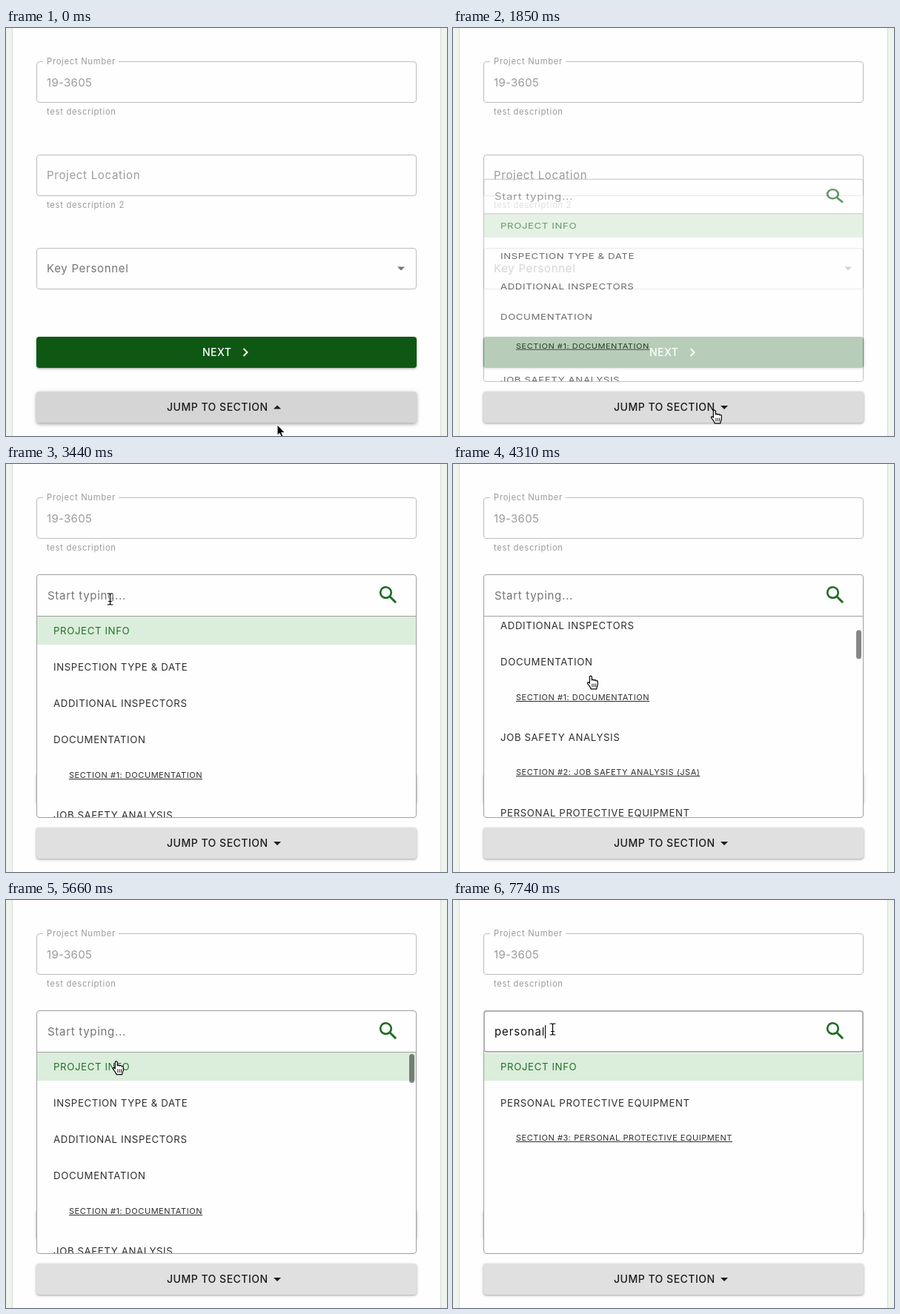
Write an HTML page that moves like this. It is 595 px wide and 551 px high and loops after 8000 ms.

```html
<!DOCTYPE html>
<html lang="en">
<head>
<meta charset="utf-8">
<title>Jump to section</title>
<style>
html, body { margin: 0; width: 100%; height: 100%; overflow: hidden; background: #eef4ed; }
svg { display: block; width: 595px; height: 551px; }
text { font: 15px Inter, "Open Sans", sans-serif; letter-spacing: .7px; }
.small { font-size: 11.25px; letter-spacing: .7px; fill: #9b9b9b; }
.field { fill: none; stroke: #bdbdbd; }
.muted { fill: #9b9b9b; }
.hint { fill: #757575; }
.button { font-size: 14px; font-weight: 500; letter-spacing: .5px; }
.item { font-size: 13.2px; letter-spacing: .64px; fill: #2e2e2e; }
.sub { font-size: 11px; letter-spacing: .55px; fill: #2e2e2e; }
.current { fill: #24702a; }
#next { filter: drop-shadow(0 1px 1px #0004) drop-shadow(0 1px 2px #0002); }
.pointer { stroke-linejoin: round; stroke-linecap: round; }
</style>
</head>
<body>
<svg viewBox="0 0 595 551">
  <defs>
    <clipPath id="listClip"><rect x="42" y="206" width="511" height="271"/></clipPath>
  </defs>
  <rect x="8.5" y="-5" width="578" height="561" fill="#fefefe" stroke="#d6ddd5"/>

  <rect class="field" x="41.5" y="45.5" width="512" height="55" rx="3.5"/>
  <path d="M50 45.5H152" stroke="#fefefe" stroke-width="2"/>
  <text class="small" x="55" y="49">Project Number</text>
  <text class="muted" x="55" y="79" style="letter-spacing:.3px">19-3605</text>
  <text class="small" x="55" y="117">test description</text>

  <rect class="field" x="41.5" y="171.5" width="512" height="55" rx="3.5"/>
  <text class="muted" x="55" y="204">Project Location</text>
  <text class="small" x="55" y="243">test description 2</text>

  <rect class="field" x="41.5" y="297.5" width="512" height="55" rx="3.5"/>
  <text class="hint" x="55" y="330">Key Personnel</text>
  <path d="M528 322.5h10l-5 5z" fill="#757575"/>

  <rect id="next" x="41" y="417" width="513" height="42" rx="4" fill="#0e5814"/>
  <text class="button" x="265" y="443" fill="#fff">NEXT</text>
  <path d="M320.5 433l5 5-5 5" fill="none" stroke="#fff" stroke-width="1.9"/>

  <rect id="jump" x="41" y="491" width="513" height="42" rx="4"/>
  <text class="button" x="217" y="517" fill="#1c1c1c">JUMP TO SECTION</text>
  <path id="caretIcon" fill="#1c1c1c"/>

  <g id="popup">
    <rect x="41.5" y="149.5" width="512" height="328" rx="3.5" fill="#fefefe" stroke="#a0a0a0"/>
    <g clip-path="url(#listClip)">
      <rect id="hover" x="42" width="511" height="38" fill="#000" fill-opacity=".04"/>
      <g id="list"></g>
      <rect id="thumb" x="544" width="7" height="39" rx="3.5" fill="#000" fill-opacity=".47"/>
    </g>
    <path id="divider" d="M42 205.5H553" stroke="#a0a0a0"/>
    <g id="focus">
      <path d="M42 206.5H553" stroke="#fefefe"/>
      <rect x="42" y="150" width="511" height="55" rx="3.5" fill="#fefefe" stroke="#b0b0b0" stroke-width="2"/>
    </g>
    <text id="query" x="56" y="183"></text>
    <path id="caret" stroke="#000"/>
    <g transform="translate(499.8 160.9) scale(1.33)" fill="none" stroke="#1f6d25" stroke-width="2">
      <circle cx="9.5" cy="9.5" r="5.5"/>
      <path d="M13.6 13.6L19.7 19.7" stroke-width="2.2"/>
    </g>
  </g>

  <g id="cursor" class="pointer">
    <path id="arrow" d="M0 0V14.2L3.2 11.3 5.3 16.3 7.8 15.2 5.7 10.4H10z" fill="#000" stroke="#fff"/>
    <g id="hand" stroke="#000">
      <path d="M-1.7 10V1.6c0-2 3-2 3 0V6c.3-1.3 2.8-1.2 2.9.3.5-1 2.6-.8 2.7.6.8-.8 2.4-.4 2.4 1.2v3.5c0 2-1.3 3.3-1.6 6.3H.2c-.4-2.5-3-4.6-4.6-7.4-.9-1.6 1-2.6 2.7-.5z" fill="#fff" stroke-width="1.2"/>
      <path d="M1.8 11v4M4.2 11v4M6.6 11v4" stroke-width=".9"/>
    </g>
    <g id="beam" fill="none">
      <path d="M-3.5-7.5H-1L0-6.5 1-7.5H3.5M-3.5 7.5H-1L0 6.5 1 7.5H3.5M0-6.5V6.5M-2 3H2" stroke="#fff" stroke-width="2.6"/>
      <path d="M-3.5-7.5H-1L0-6.5 1-7.5H3.5M-3.5 7.5H-1L0 6.5 1 7.5H3.5M0-6.5V6.5M-2 3H2" stroke="#000" stroke-width="1.2"/>
    </g>
  </g>
</svg>
<script>
const LOOP = 8000, OPEN = 1850, FOCUS = 6280;
const $ = id => document.getElementById(id);
const set = (id, attrs) => {
  for (const key in attrs) $(id).setAttribute(key, attrs[key]);
};
const show = (id, on) => { $(id).style.display = on ? '' : 'none'; };
const ramp = (t, from, to) => Math.min(1, Math.max(0, (t - from) / (to - from)));
const easeOut = (u, power = 2) => 1 - (1 - u) ** power;

// Linear track of [time, ...values]
function track(keys, t) {
  const i = keys.findIndex(k => k[0] > t);
  if (i < 0) return keys.at(-1).slice(1);
  const a = keys[i - 1], b = keys[i], u = ramp(t, a[0], b[0]);
  return a.slice(1).map((v, n) => v + (b[n + 1] - v) * u);
}

const CURSOR = [
  [0, 366, 536], [60, 366, 536], [400, 371, 471], [640, 368, 477], [840, 360, 500],
  [1250, 353, 516], [2800, 353, 516], [3090, 129.5, 194], [3330, 129.5, 194],
  [3440, 140.5, 182.5], [3800, 140.5, 182.5], [3970, 186, 286], [5600, 186, 286],
  [5660, 149, 218], [5860, 138, 180], [6060, 134.5, 174.5]
];
const HOVER = [[0, 1], [300, 1], [520, 0], [760, 0], [1000, 1], [1770, 1], [1850, .36], [1960, 0]];
const KEYS = [6740, 7040, 7150, 7330, 7430, 7540, 7640, 7740];
const WORD = 'personal';
const SECTIONS = [
  ['PROJECT INFO'],
  ['INSPECTION TYPE & DATE'],
  ['ADDITIONAL INSPECTORS'],
  ['DOCUMENTATION', 'SECTION #1: DOCUMENTATION'],
  ['JOB SAFETY ANALYSIS', 'SECTION #2: JOB SAFETY ANALYSIS (JSA)'],
  ['PERSONAL PROTECTIVE EQUIPMENT', 'SECTION #3: PERSONAL PROTECTIVE EQUIPMENT'],
  ['HOUSEKEEPING']
];

function add(tag, attrs, label = '') {
  const el = document.createElementNS('http://www.w3.org/2000/svg', tag);
  for (const key in attrs) el.setAttribute(key, attrs[key]);
  el.textContent = label;
  $('list').append(el);
  return el;
}

let rows = [], shownQuery = null;

// The current section stays listed whatever is typed
function fillList(query) {
  shownQuery = query;
  rows = [];
  $('list').replaceChildren();
  add('rect', { x: 42, y: 206, width: 511, height: 38, fill: '#dbeddb' });
  let y = 225.1;
  SECTIONS.forEach(([name, sub], i) => {
    if (i && !name.includes(query.toUpperCase())) return;
    rows.push(y);
    add('text', { x: 64, y: Math.round(y) + 5, class: i ? 'item' : 'item current' }, name);
    if (sub) {
      const middle = Math.round(y + 47.1);
      const label = add('text', { x: 85, y: middle + 4, class: 'sub' }, sub);
      add('rect', { x: 85, y: middle + 5, width: label.getComputedTextLength(), height: 1, fill: '#2e2e2e' });
    }
    y += sub ? 101.8 : 49.1;
  });
}

function drawButton(t) {
  const [h] = track(HOVER, t);
  const grey = Math.round(224 - 11 * h);
  set('jump', { fill: `rgb(${grey},${grey},${grey})` });
  $('jump').style.filter =
    `drop-shadow(0 ${1 + h}px ${1 + h}px #0004) drop-shadow(0 1px ${2 + h}px #0002)`;
  set('caretIcon', { d: t < OPEN ? 'M361 514.5h10l-5-5z' : 'M361 510h10l-5 5z' });
}

function drawPopup(t, x, y) {
  const grow = easeOut(ramp(t, OPEN, OPEN + 110));
  const scale = .83 + .17 * grow;
  show('popup', t >= OPEN);
  set('popup', {
    opacity: .7 + .3 * grow,
    transform: `translate(0 ${477.5 * (1 - scale)}) scale(1 ${scale})`
  });

  const query = WORD.slice(0, KEYS.filter(k => k <= t).length);
  if (query !== shownQuery) fillList(query);

  const scroll = 219 * (easeOut(ramp(t, 4150, 4780), 2.2) - easeOut(ramp(t, 4970, 5310)));
  set('list', { transform: `translate(0 ${-Math.round(scroll)})` });
  set('thumb', {
    y: 208 + scroll * .155,
    opacity: t < 4190 ? 0 : 1 - ramp(t, FOCUS, 6510)
  });

  const over = rows.find((row, i) => i && Math.abs(y - row) < 19);
  const hovered = over && !scroll && t > 2800 && y < 477;
  show('hover', hovered);
  if (hovered) set('hover', { y: Math.round(over) - 19 });

  const focused = t >= FOCUS;
  show('focus', focused);
  show('divider', !focused);
  show('caret', focused);
  const label = $('query');
  label.textContent = query || 'Start typing...';
  label.style.letterSpacing = query ? '.85px' : '.7px';
  set('query', { fill: query ? '#111' : '#757575' });
  const end = query ? label.getComputedTextLength() : 0;
  set('caret', { d: `M${Math.floor(56 + end) + .5} 169V187` });
}

function drawCursor(t, x, y) {
  const beam = t > OPEN && y > 149 && y < 206;
  const hand = !beam && (y > 491 && y < 533 || t > OPEN && y >= 206 && y < 477);
  show('beam', beam);
  show('hand', hand);
  show('arrow', !beam && !hand);
  set('cursor', { transform: `translate(${x} ${y})` });
}

function draw(now) {
  const t = now % LOOP;
  const [x, y] = track(CURSOR, t);
  drawButton(t);
  drawPopup(t, x, y);
  drawCursor(t, x, y);
}

const start = performance.now();
function tick() {
  draw(performance.now() - start);
  requestAnimationFrame(tick);
}
tick();
</script>
</body>
</html>
```
